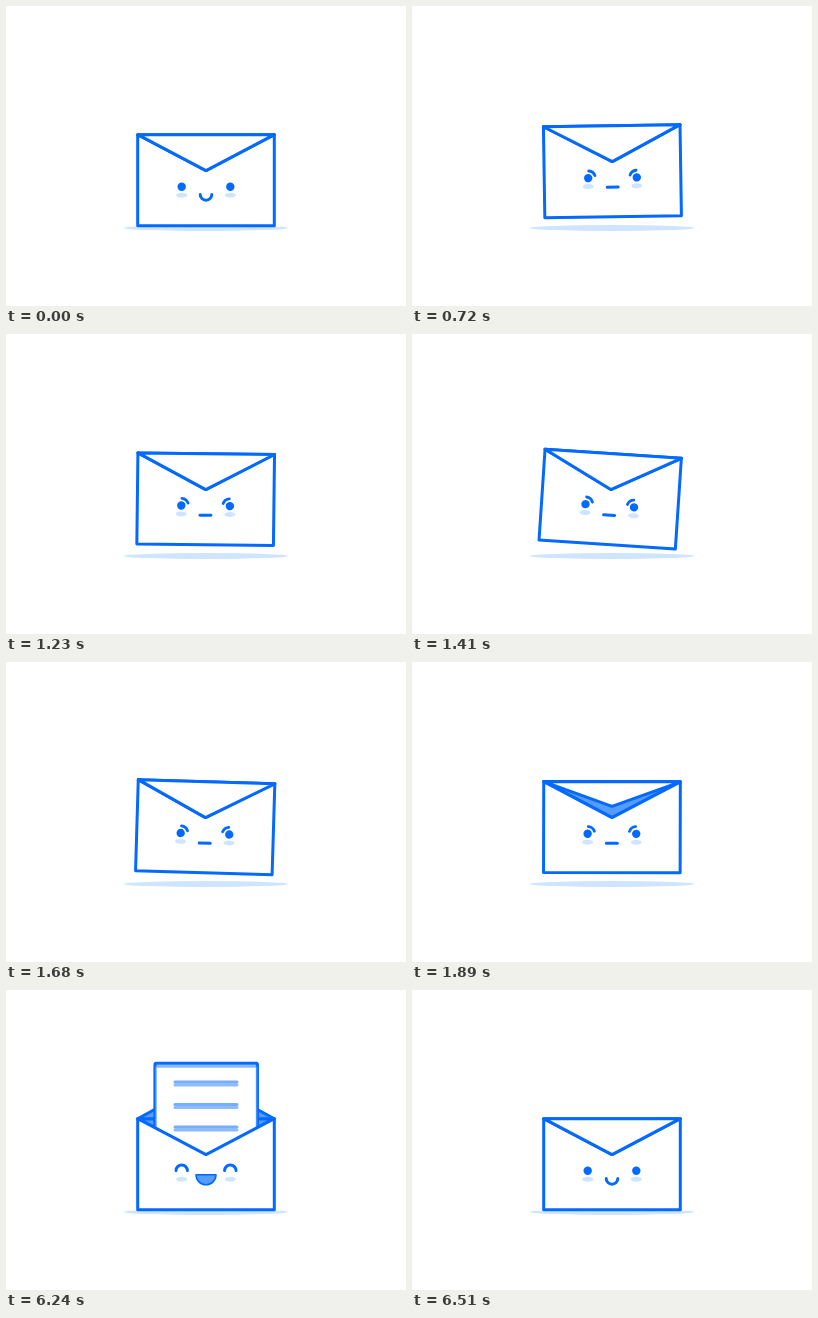
Animation of 400x300 px, one loop 7170 ms. Source, as an HTML page with a canvas:

```html
<!DOCTYPE html>
<html lang="en">
<head>
<meta charset="utf-8">
<title>Envelope</title>
<style>
  html, body { margin: 0; width: 100%; height: 100%; overflow: hidden; background: #fff; }
  canvas { display: block; width: 400px; height: 300px; }
</style>
</head>
<body>
<canvas id="stage"></canvas>
<script>
const LOOP = 7170, STEP = 30;
const BLUE = '#0369ff', MID = '#559cff', PALE = '#cfe5ff', WHITE = '#fff';
const LEFT = 131.7, RIGHT = 268.3, TOP = 128.7, BOTTOM = 219.7, TIP = 164.6;
const LIFT = 9, PIVOT = 147, TUCK = 62;

const canvas = document.getElementById('stage');
const dpr = window.devicePixelRatio || 1;
canvas.width = 400 * dpr;
canvas.height = 300 * dpr;
const ctx = canvas.getContext('2d');

const ramp = (t, a, b) => Math.min(1, Math.max(0, (t - a) / (b - a)));
const smooth = p => p * p * (3 - 2 * p);
const easeOut = p => 1 - (1 - p) * (1 - p);

function paint(fill, stroke, width = 3) {
  if (fill) { ctx.fillStyle = fill; ctx.fill(); }
  if (stroke) { ctx.strokeStyle = stroke; ctx.lineWidth = width; ctx.stroke(); }
}

function poly(points, closed, fill, stroke) {
  ctx.beginPath();
  points.forEach(([x, y]) => ctx.lineTo(x, y));
  if (closed) ctx.closePath();
  paint(fill, stroke);
}

function arc(x, y, r, from, to, fill, stroke, width) {
  ctx.beginPath();
  ctx.arc(x, y, r, from * Math.PI / 180, to * Math.PI / 180);
  paint(fill, stroke, width);
}

function oval(x, y, rx, ry) {
  ctx.beginPath();
  ctx.ellipse(x, y, rx, ry, 0, 0, Math.PI * 2);
  paint(PALE);
}

// Everything that moves, as a function of loop time.
function pose(t) {
  const rise = easeOut(ramp(t, 510, 720)) * (1 - smooth(ramp(t, 1980, 2070)));
  const swing = Math.min(3.8, 2.6 + (t - 1020) * 0.0031);
  const calm = 1 - ramp(t, 1860, 1980);
  const closing = smooth(ramp(t, 6375, 6510));
  return {
    lift: LIFT * rise,
    angle: swing * rise * calm * Math.cos((t - 1410) / 148 * Math.PI * 2),
    flap: 1 - 2 * smooth(ramp(t, 1860, 1980)) + 2 * closing,
    sunk: t < 4000
      ? TUCK * (1 - easeOut(ramp(t, 1950, 2020)))
      : TUCK * smooth(ramp(t, 6210, 6435)),
    mood: t < 585 || t >= 6420 ? 'calm' : t < 1950 ? 'cross' : 'happy'
  };
}

function paper(dy) {
  const foot = Math.min(170 + dy, 217);
  ctx.beginPath();
  ctx.roundRect(149, 73.2 + dy, 102.4, foot - 73.2 - dy, 1);
  paint(WHITE, BLUE);
  for (const y of [92, 114.4, 136.9]) {
    if (y + dy < foot) poly([[169, y + dy], [231, y + dy]], false, null, BLUE);
  }
}

function flap(k) {
  const tip = TOP + k * (k > 0 ? TIP - TOP : 37.5);
  poly([[LEFT, TOP], [200, tip], [RIGHT, TOP]], true, k > 0 ? WHITE : MID, BLUE);
}

function face(mood) {
  for (const side of [-1, 1]) {
    const x = 200 + side * 24.3;
    oval(x, 189.2, 5.5, 2.5);
    if (mood === 'happy') arc(x, 180.6, 5.7, 180, 360, null, BLUE);
    else arc(x, 180.8, 4.2, 0, 360, BLUE);
    if (mood === 'cross') {
      const from = side < 0 ? -85 : 200;
      arc(x, 180.8, 7.2, from, from + 65, null, BLUE, 2.8);
    }
  }
  if (mood === 'calm') arc(200, 188.4, 5.8, 0, 180, null, BLUE);
  else if (mood === 'cross') poly([[194.5, 190.2], [205.5, 190.2]], false, null, BLUE);
  else {
    ctx.beginPath();
    ctx.arc(200, 184.8, 10, 0, Math.PI);
    ctx.closePath();
    paint(MID, BLUE, 1.5);
  }
}

function draw(t) {
  const p = pose(t);
  ctx.setTransform(dpr, 0, 0, dpr, 0, 0);
  ctx.fillStyle = WHITE;
  ctx.fillRect(0, 0, 400, 300);
  ctx.lineCap = ctx.lineJoin = 'round';
  oval(200, 222, 82, 3);

  ctx.translate(200, PIVOT - p.lift);
  ctx.rotate(p.angle * Math.PI / 180);
  ctx.translate(-200, -PIVOT);

  poly([[LEFT, TOP], [RIGHT, TOP], [200, TIP]], true, MID, BLUE);
  if (p.flap <= 0) flap(p.flap);
  if (p.flap < 1) {
    // A slow start leaves a soft trail under the sheet.
    if (p.sunk > 0 && p.sunk < 4 && t > 4000) {
      paper(0);
      ctx.globalAlpha = 0.45;
      paper(p.sunk);
      ctx.globalAlpha = 1;
    } else if (p.sunk < TUCK) paper(p.sunk);
  }
  poly([[LEFT, TOP], [200, TIP], [RIGHT, TOP], [RIGHT, BOTTOM], [LEFT, BOTTOM]], true, WHITE, BLUE);
  if (p.flap > 0) flap(p.flap);
  face(p.mood);
}

const start = performance.now();
function tick() {
  const t = (performance.now() - start) % LOOP;
  draw(Math.floor(t / STEP) * STEP);
  requestAnimationFrame(tick);
}
tick();
</script>
</body>
</html>
```
